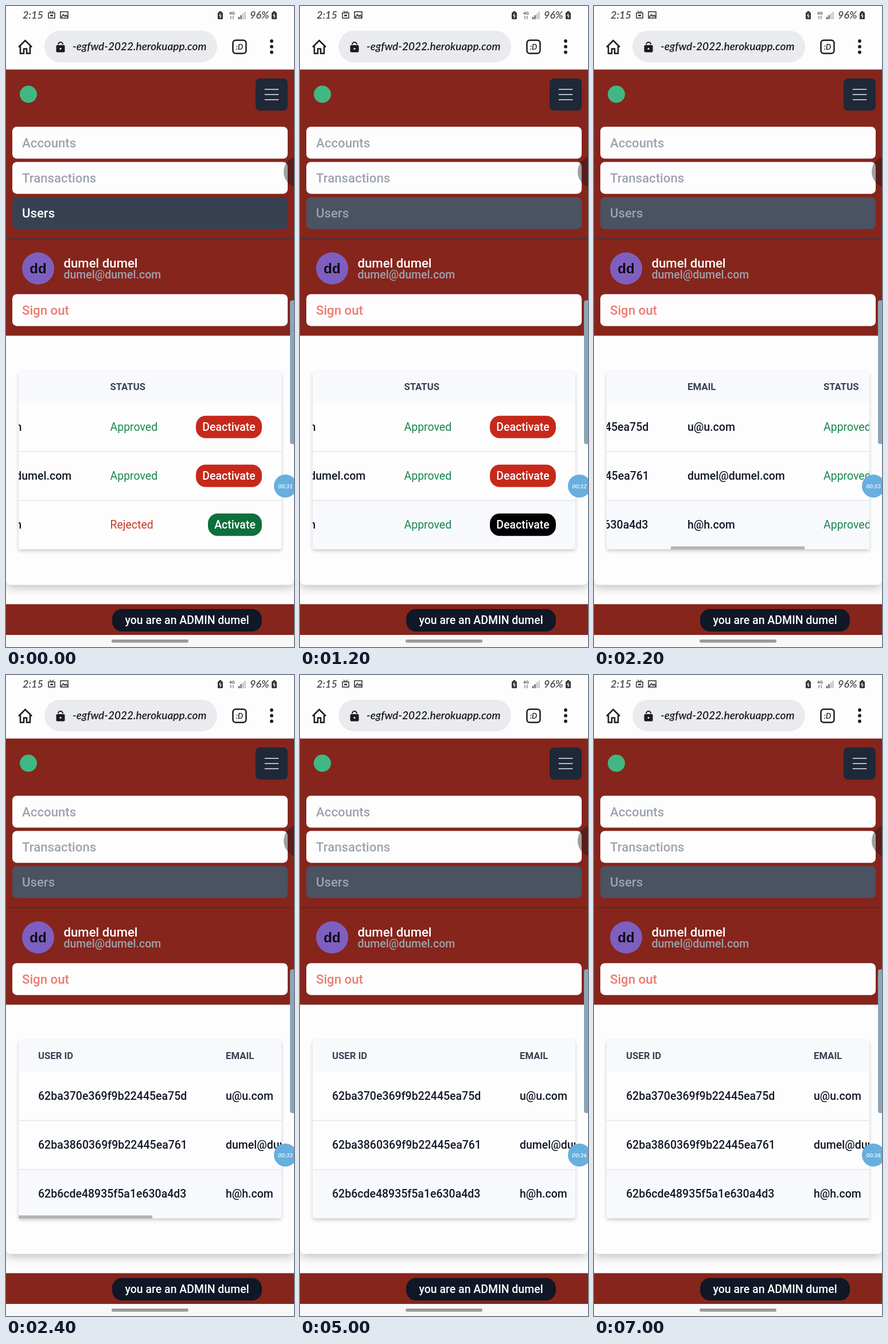
Write an HTML page with a canvas that moves like this. It is 502 by 1115 pixels and loops after 8000 ms.

```html
<!DOCTYPE html>
<html lang="en">
<head>
<meta charset="utf-8">
<title>User list</title>
<style>
html, body { margin: 0; width: 100%; height: 100%; overflow: hidden; background: #fefdfe; }
canvas { display: block; width: 502px; height: 1115px; }
</style>
</head>
<body>
<canvas id="stage"></canvas>
<script>
const W = 502, H = 1115, LOOP = 8000;
const canvas = document.getElementById('stage');
const ctx = canvas.getContext('2d');
const dpr = window.devicePixelRatio || 1;
canvas.width = W * dpr;
canvas.height = H * dpr;

const SANS = 'Roboto, sans-serif';
const HAND = 'italic 600 {}px Lato, sans-serif';
const RED = '#86251c', WHITE = '#fefdfe', INK = '#111827', GRAY = '#9ca3af';
const EMAIL = 'dumel@dumel.com';
const USERS = [
  ['62ba370e369f9b22445ea75d', 'u@u.com'],
  ['62ba3860369f9b22445ea761', EMAIL],
  ['62b6cde48935f5a1e630a4d3', 'h@h.com']
];

function rect(x, y, w, h, color) {
  ctx.fillStyle = color;
  ctx.fillRect(x, y, w, h);
}

function box(x, y, w, h, r, color) {
  ctx.beginPath();
  ctx.roundRect(x, y, w, h, r);
  ctx.fillStyle = color;
  ctx.fill();
}

function disc(x, y, r, color) {
  ctx.beginPath();
  ctx.arc(x, y, r, 0, Math.PI * 2);
  ctx.fillStyle = color;
  ctx.fill();
}

function line(points, width, color, close) {
  ctx.beginPath();
  for (let i = 0; i < points.length; i += 2) ctx.lineTo(points[i], points[i + 1]);
  if (close) ctx.closePath();
  ctx.lineWidth = width;
  ctx.strokeStyle = color;
  ctx.stroke();
}

function text(s, x, y, size, color, weight = 500, align = 'left') {
  ctx.font = `${weight} ${size}px ${SANS}`;
  ctx.textAlign = align;
  ctx.fillStyle = color;
  ctx.fillText(s, x, y);
}

function hand(s, x, y, size, color = '#1b1b1d', align = 'left') {
  ctx.font = HAND.replace('{}', size);
  ctx.textAlign = align;
  ctx.fillStyle = color;
  ctx.fillText(s, x, y);
}

function shadow(color, blur, dy) {
  ctx.shadowColor = color;
  ctx.shadowBlur = blur * dpr;
  ctx.shadowOffsetY = dy * dpr;
}

function noShadow() {
  shadow('transparent', 0, 0);
}

function battery(x, y) {
  box(x, y + 2, 9, 12, 1.5, '#333');
  rect(x + 2.5, y, 4, 2, '#333');
  line([x + 5, y + 4, x + 3, y + 8, x + 6, y + 8, x + 4, y + 12], 1.2, '#fff');
}

function statusBar() {
  hand('2:15', 29, 22, 18, '#444');
  ctx.lineWidth = 1.7;
  ctx.strokeStyle = '#444';
  ctx.strokeRect(74, 12, 11, 9);
  line([76, 8.5, 79.5, 12, 83, 8.5], 1.5, '#444');
  rect(77, 15, 5, 3, '#444');
  ctx.lineWidth = 1.7;
  ctx.strokeRect(95, 10, 13, 11);
  line([96, 20, 100, 15, 103, 18, 105, 16, 108, 20], 2, '#444');

  battery(369, 9);
  text('4G', 394, 15, 8, '#444', 500, 'center');
  line([392, 17, 392, 23], 1.3, '#777');
  line([396, 17, 396, 23], 1.3, '#777');
  for (let i = 0; i < 4; i++) {
    rect(405 + i * 3.5, 19 - i * 3, 2.2, 4 + i * 3, i < 2 ? '#555' : '#bbb');
  }
  hand('96%', 425, 22, 18, '#444');
  battery(463, 9);
}

function toolbar() {
  line([25, 70, 25, 82.5, 31, 82.5, 31, 74.5, 36, 74.5, 36, 82.5, 42, 82.5, 42, 70], 2.5, '#1b1b1d');
  line([22, 71.5, 33.5, 60, 45, 71.5], 2.5, '#1b1b1d');

  box(67, 43, 301, 55, 27.5, '#e9ebee');
  box(87.5, 68, 15, 12.5, 2, '#1b1b1d');
  ctx.beginPath();
  ctx.arc(95, 67, 4, Math.PI, 0);
  ctx.lineWidth = 2;
  ctx.strokeStyle = '#1b1b1d';
  ctx.stroke();
  disc(95, 74.3, 1.6, '#e9ebee');
  hand('-egfwd-2022.herokuapp.com', 116, 77, 19);

  ctx.beginPath();
  ctx.roundRect(395.5, 59.5, 23, 23, 5);
  ctx.lineWidth = 2.5;
  ctx.stroke();
  hand(':D', 407, 75.5, 13, '#1b1b1d', 'center');
  for (const y of [61, 70.7, 80.4]) disc(463, y, 2.9, '#1b1b1d');
}

function navItem(label, y, bg, color) {
  box(11, y, 480, 55.5, 8, bg);
  text(label, 28, y + 35.5, 22.2, color);
}

function menu(t) {
  rect(0, 110.5, W, 463, RED);
  if (t >= 400 && t < 1200) rect(0, 110, W, 1.5, '#4a1c18');
  disc(39, 153.5, 15, '#41b883');
  box(435, 126, 56, 56, 8, '#1f2838');
  ctx.lineCap = 'round';
  for (const y of [145, 154, 163]) line([451.5, y, 474.5, y], 2, '#b4bac4');
  ctx.lineCap = 'butt';

  const hover = t >= 400;
  navItem('Accounts', 210, WHITE, GRAY);
  navItem('Transactions', 271.2, WHITE, GRAY);
  navItem('Users', 332.4, hover ? '#4b5362' : '#374151', hover ? GRAY : '#fff');
  rect(0, 403.8, W, 1.5, '#40303a');

  disc(56, 456.5, 28, '#7e5fc0');
  ctx.font = 'bold 24px "Liberation Sans", Arial, sans-serif';
  ctx.textAlign = 'center';
  ctx.fillStyle = '#0c0a12';
  ctx.fillText('dd', 56, 465);
  text('dumel dumel', 100.5, 454.5, 22.2, '#fff');
  text(EMAIL, 100.5, 474, 19.5, GRAY);
  navItem('Sign out', 501.2, WHITE, '#ee7a6f');
}

function button(label, right, y, color) {
  const w = label === 'Activate' ? 94 : 115;
  box(right - w, y - 19.3, w, 39, 17, color);
  text(label, right - w / 2, y + 7, 19.5, '#fff', 500, 'center');
}

function table(t) {
  const scroll = t < 2200 ? 438.5 : t < 2400 ? 220 : 0;
  shadow('rgba(0,0,0,.2)', 6, 3);
  box(22, 635, 458, 310, 4, WHITE);
  noShadow();

  ctx.save();
  ctx.beginPath();
  ctx.roundRect(22, 635, 458, 310, 4);
  ctx.clip();
  rect(22, 635, 458, 55.5, '#f7f9fc');
  if (t >= 400) rect(22, 860, 458, 85, '#f7f9fc');
  rect(22, 774.3, 458, 1.5, '#e3e7ec');
  rect(22, 859.3, 458, 1.5, '#e3e7ec');

  ctx.translate(-scroll, 0);
  const cols = [56, 383, 620];
  ['USER ID', 'EMAIL', 'STATUS'].forEach((s, i) => text(s, cols[i], 668, 16.7, '#374151', 700));
  USERS.forEach(([id, mail], i) => {
    const y = 732 + i * 85, last = i === 2;
    const approved = !last || t >= 600;
    text(id, cols[0], y + 7, 19.5, INK);
    text(mail, cols[1], y + 7, 19.5, INK);
    text(approved ? 'Approved' : 'Rejected', cols[2], y + 7, 19.5, approved ? '#178650' : '#c83a2b', 400);
    const color = last ? (t < 400 ? '#0d703c' : '#000') : '#c6291b';
    button(approved ? 'Deactivate' : 'Activate', 884.5, y, color);
  });
  ctx.restore();

  if (t >= 2200 && t < 2800) rect(22 + scroll * 0.509, 940, 233, 5.5, '#b5b5b6');
}

function overlays(t) {
  disc(512, 288.5, 28, 'rgba(20,20,20,.4)');
  box(495, 512, 10, 250, 4, '#8ba5b9');
  disc(487, 835, 20, '#66afdf');
  hand('00:' + (31 + Math.floor(t / 1000)), 487, 838.5, 10, '#fff', 'center');
}

function draw(t) {
  ctx.setTransform(dpr, 0, 0, dpr, 0, 0);
  rect(0, 0, W, H, WHITE);
  shadow('rgba(0,0,0,.22)', 16, 6);
  box(0, 540, W, 467, 8, WHITE);
  noShadow();
  statusBar();
  toolbar();
  menu(t);
  table(t);
  rect(0, 1040.5, W, 53.5, RED);
  box(185, 1049, 261, 39, 17, '#101726');
  text('you are an ADMIN dumel', 315.5, 1074.7, 19.5, '#fff', 500, 'center');
  rect(0, 1094, W, 21, '#f9f8f9');
  box(184, 1102, 134, 5.5, 2.7, '#9a9a9b');
  overlays(t);
}

function frame() {
  draw(performance.now() % LOOP);
  requestAnimationFrame(frame);
}
frame();
</script>
</body>
</html>
```
